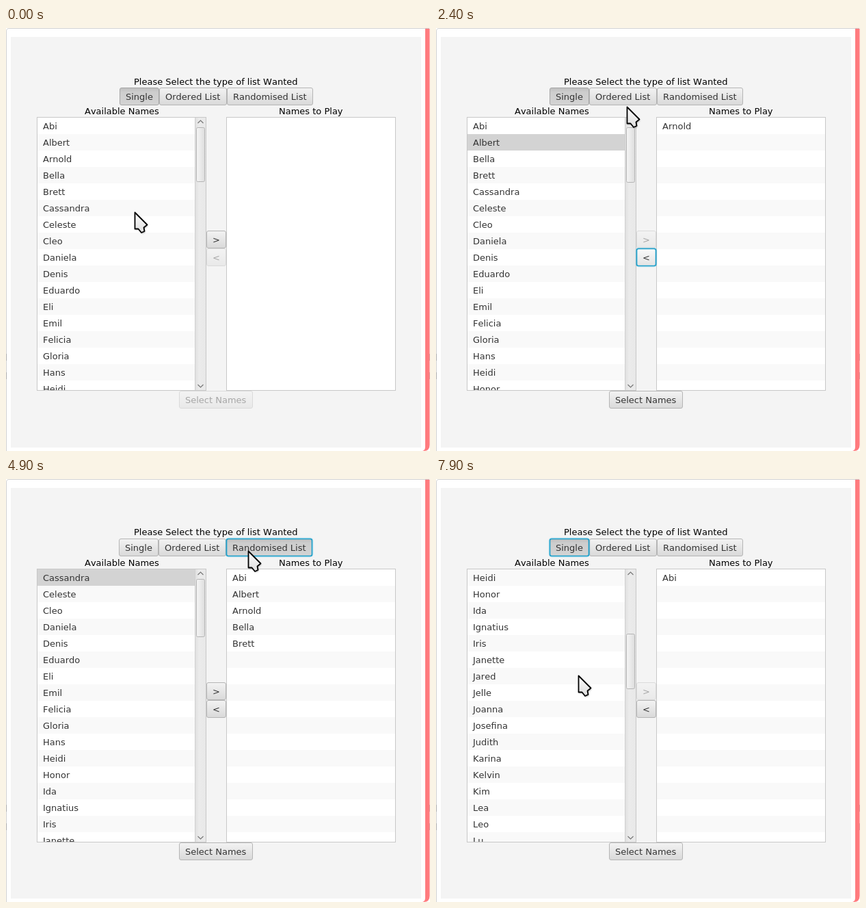
Animation of 620 by 618 pixels, one loop 8000 ms. Source, as an HTML page:

```html
<!DOCTYPE html>
<html lang="en">
<head>
<meta charset="utf-8">
<title>Name list picker</title>
<style>
  html, body { margin: 0; width: 100%; height: 100%; overflow: hidden; background: #fff; }
  svg { display: block; }
  text { font: 13px "DejaVu Sans", sans-serif; font-kerning: none; fill: #333; white-space: pre; }
  .label { fill: #000; }
  .button { fill: url(#face); stroke: #b5b5b5; }
  .selected { fill: url(#sunk); stroke: #a6a6a6; }
  .focused { stroke: #1a9fcb; stroke-width: 1.6; }
  .focused:not(.selected) { fill: url(#lit); }
  .glow { fill: none; stroke: #039ed3; stroke-opacity: .18; stroke-width: 3; }
  .disabled { opacity: .4; }
  .chevron { fill: none; stroke: #777; stroke-width: 1.2; }
  .pointer { fill: url(#arrow); stroke: #000; stroke-width: 1.8; stroke-linejoin: round; }
</style>
</head>
<body>
<svg width="620" height="618" viewBox="0 0 620 618">
  <defs>
    <linearGradient id="face" x2="0" y2="1"><stop stop-color="#f3f3f3"/><stop offset="1" stop-color="#d9d9d9"/></linearGradient>
    <linearGradient id="lit" x2="0" y2="1"><stop stop-color="#fafafa"/><stop offset="1" stop-color="#e3e3e3"/></linearGradient>
    <linearGradient id="sunk" x2="0" y2="1"><stop stop-color="#bebebe"/><stop offset=".25" stop-color="#cdcdcd"/><stop offset="1" stop-color="#d3d3d3"/></linearGradient>
    <linearGradient id="track"><stop stop-color="#dedede"/><stop offset=".4" stop-color="#ebebeb"/><stop offset="1" stop-color="#e8e8e8"/></linearGradient>
    <linearGradient id="thumb"><stop stop-color="#f5f5f5"/><stop offset="1" stop-color="#dedede"/></linearGradient>
    <linearGradient id="arrow" x2="0" y2="1"><stop stop-color="#fff"/><stop offset="1" stop-color="#dcdcdc"/></linearGradient>
    <filter id="soft" x="-50%" y="-50%" width="200%" height="200%"><feGaussianBlur stdDeviation="1.2"/></filter>
    <clipPath id="left"><path d="M46 131h246v398h-246z"/></clipPath>
    <clipPath id="right"><path d="M323 131h246v398h-246z"/></clipPath>
  </defs>
  <path d="M.5 618V5Q.5.5 5 .5H619" fill="none" stroke="#d2d2d2"/>
  <path d="M.5 476v10M.5 503v10M619.5 476v10M619.5 503v10" stroke="#999" opacity=".6"/>
  <path d="M613 1h6.500V609Q619.500 618 611 618H609Q613 617 613 612Z" fill="#ff7b7e"/>
  <path d="M7 13h600v600h-600z" fill="#f4f4f4"/>
  <g id="stage"></g>
</svg>
<script>
const LOOP = 8000, STEP = 100, ROW = 24, TOTAL = 77;
const names = ('Abi Albert Arnold Bella Brett Cassandra Celeste Cleo Daniela Denis Eduardo Eli Emil ' +
  'Felicia Gloria Hans Heidi Honor Ida Ignatius Iris Janette Jared Jelle Joanna Josefina Judith ' +
  'Karina Kelvin Kim Lea Leo Lu').split(' ');

// Each entry changes the state from its time on
const events = [
  [0, { picked: [], row: -1, mode: 0, focus: '', top: 0 }],
  [400, { row: 2, focus: 'list' }],
  [800, { focus: 'add' }],
  [1000, { picked: [2], row: 1, focus: 'remove' }],
  [2900, { mode: 1, focus: 'mode' }],
  [3700, { picked: [1, 2], row: 0, focus: 'add' }],
  [3800, { picked: [0, 1, 2] }],
  [4100, { picked: [0, 1, 2, 3] }],
  [4300, { picked: [0, 1, 2, 3, 4] }],
  [4900, { mode: 2, focus: 'mode' }],
  [5900, { picked: [0], row: 4, mode: 0 }],
  [7100, { top: 3 }], [7200, { top: 6 }],
  [7700, { top: 9 }], [7800, { top: 12 }], [7900, { top: 15 }]
];

// Pointer tip: time, x, y
const path = [
  [0, 188, 269], [200, 205, 200], [400, 205, 200], [700, 308, 308], [1000, 308, 308],
  [1600, 302, 312], [2100, 302, 312], [2400, 279, 115], [2700, 279, 115], [2800, 278, 104],
  [2900, 278, 104], [3300, 318, 325], [3500, 298, 304], [4200, 298, 304], [4500, 355, 108],
  [4600, 355, 108], [4700, 354, 105], [4900, 354, 105], [5300, 335, 107], [5400, 335, 107],
  [5800, 168, 91], [6300, 168, 91], [6400, 230, 150], [6500, 305, 235], [6600, 250, 278],
  [6700, 208, 287], [LOOP, 208, 287]
];

function pointerAt(t) {
  const i = path.findIndex(p => p[0] > t);
  const [t0, x0, y0] = path[i - 1], [t1, x1, y1] = path[i];
  const k = (t - t0) / (t1 - t0);
  return [Math.round(x0 + (x1 - x0) * k), Math.round(y0 + (y1 - y0) * k)];
}

const stateAt = t => Object.assign({}, ...events.filter(e => e[0] <= t).map(e => e[1]));
const rect = (x, y, w, h, attrs) => `<rect x="${x}" y="${y}" width="${w}" height="${h}" ${attrs}/>`;
const text = (x, y, s, attrs = '') =>
  `<text x="${x}" y="${y}" ${attrs}>${s.replace('<', '&lt;')}</text>`;

function button(x, y, w, label, pad, { selected, focused, disabled } = {}) {
  const cls = ['button', selected && 'selected', focused && 'focused'].filter(Boolean).join(' ');
  return `<g class="${disabled ? 'disabled' : ''}">` +
    (focused ? rect(x, y, w, 26, 'rx="3.5" class="glow"') : '') +
    rect(x + .5, y + .5, w - 1, 25, `rx="2.5" class="${cls}"`) +
    text(x + pad, y + 18, label) + '</g>';
}

function list(x, width, clip, items, { top = 0, row = -1, focused, striped = true }) {
  let rows = '';
  for (let i = 0; i < 17; i++) {
    const n = top + i, y = 131 + i * ROW, on = n === row;
    const fill = on ? (focused ? '#0096c9' : '#d3d3d3') : n % 2 && striped ? '#f9f9f9' : '#fff';
    rows += rect(x + 1, y, width, ROW, `fill="${fill}"`);
    if (items[n]) rows += text(x + 9, y + 17, items[n], on && focused ? 'style="fill:#fff"' : '');
  }
  return rect(x + .5, 130.5, 247, 399, 'fill="#fff" stroke="#c8c8c8"') +
    `<g clip-path="url(#${clip})">${rows}</g>` +
    (focused ? rect(x + .5, 130.5, 247, 399, 'class="focused" style="fill:none"') : '');
}

function scrollbar(count, top) {
  const h = 370 * 398 / (ROW * count), y = 145 + top * 16 / 3;
  return rect(276, 131, 16, 398, 'fill="url(#track)"') +
    '<path d="M276.5 131v398" stroke="#d0d0d0"/>' +
    rect(278.5, Math.round(y) + .5, 12, Math.round(h) - 1, 'rx="2" fill="url(#thumb)" stroke="#b4b4b4"') +
    '<path class="chevron" d="M280.500 139l4-4 4 4M280.500 521l4 4 4-4"/>';
}

function modes(s) {
  const dx = s.mode === 2 ? -1 : 0;
  const items = [['Single', 166, 58], ['Ordered List', 224, 99], ['Randomised List', 323, 126]];
  const draw = i => {
    const [label, x, w] = items[i];
    return button(x + dx, 87, w, label, 9, { selected: i === s.mode, focused: i === s.mode && s.focus === 'mode' });
  };
  return [0, 1, 2].filter(i => i !== s.mode).concat(s.mode).map(draw).join('');
}

function pointer(x, y) {
  const d = 'M.5.5V24.500H5.500L10 30 14.500 28 13.500 22.500 18.500 18.500Z';
  return `<g transform="translate(${x} ${y})"><path d="${d}" transform="translate(1 1.500)" opacity=".3" filter="url(#soft)"/>` +
    `<path d="${d}" class="pointer"/></g>`;
}

function render(t) {
  const s = stateAt(t), shift = s.focus === 'mode' ? 1 : 0;
  const empty = !s.picked.length;
  const free = names.filter((_, i) => !s.picked.includes(i));
  const add = button(293, 296, 29, '>', 9, { focused: s.focus === 'add', disabled: s.mode === 0 && !empty });
  const remove = button(293, 322, 29, '<', 9, { focused: s.focus === 'remove', disabled: empty });
  return text(187, 83 - shift, 'Please Select the type of list Wanted', 'class="label"') +
    modes(s) +
    `<g transform="translate(0 ${shift})">` +
    text(115, 126, 'Available Names', 'class="label"') +
    text(399, 126, 'Names to Play', 'class="label"') +
    list(45, 230, 'left', free, { top: s.top, row: s.row, focused: s.focus === 'list' }) +
    scrollbar(TOTAL - s.picked.length, s.top) +
    list(322, 246, 'right', s.picked.map(i => names[i]), { striped: !empty }) +
    (s.focus === 'add' ? remove + add : add + remove) +
    button(253, 530, 108, 'Select Names', 9, { disabled: empty }) +
    '</g>' + pointer(...pointerAt(t));
}

const stage = document.getElementById('stage');
const start = performance.now();
let shown = -1;

function tick() {
  const t = Math.floor((performance.now() - start) % LOOP / STEP) * STEP;
  if (t !== shown) {
    shown = t;
    stage.innerHTML = render(t);
  }
  requestAnimationFrame(tick);
}
tick();
</script>
</body>
</html>
```
